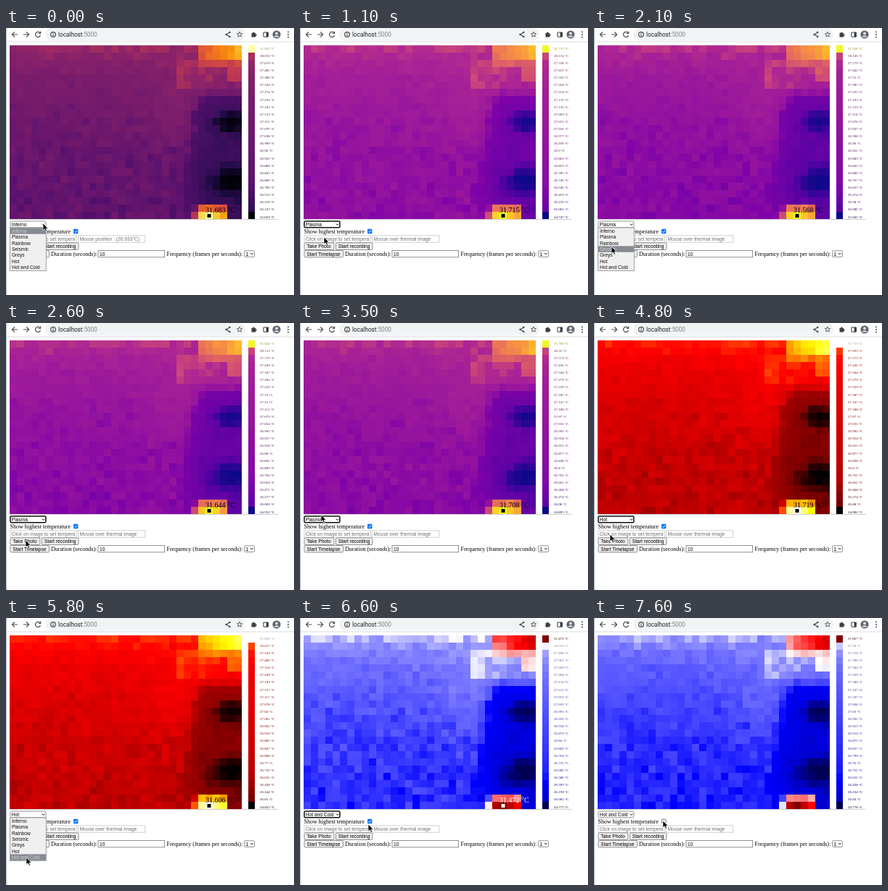
Write an HTML page with a canvas that moves like this. It is 397x369 px and loops after 8000 ms.

```html
<!DOCTYPE html>
<html lang="en">
<head>
<meta charset="utf-8">
<title>Thermal camera</title>
<style>
html, body { margin: 0; width: 100%; height: 100%; overflow: hidden; background: #fff; }
canvas, svg { position: absolute; left: 0; top: 0; }
text { font: 6.67px "Liberation Sans", Arial, sans-serif; white-space: pre; }
.serif { font: 8px "Liberation Serif", "Times New Roman", serif; }
.scale { font: 5px "Liberation Serif", "Times New Roman", serif; }
.peak { font: 10px "Liberation Serif", "Times New Roman", serif; }
.url { font: 8.2px Roboto, sans-serif; }
.hint { fill: #707070; }
.icon { fill: none; stroke: #4a4d51; stroke-width: 1.2; }
</style>
</head>
<body>
<canvas id="heat" width="397" height="369"></canvas>
<svg id="ui" width="397" height="369"></svg>
<script>
const LOOP = 8000, COLS = 32, ROWS = 24, CELL = 10, LEFT = 5, TOP = 24;
const OPTIONS = ['Inferno', 'Plasma', 'Rainbow', 'Seismic', 'Greys', 'Hot', 'Hot and Cold'];

// Palette from evenly spaced hex stops
function ramp(hex) {
  const stops = hex.split(' ').map(h => [0, 2, 4].map(i => parseInt(h.substr(i, 2), 16) / 255));
  const last = stops.length - 1;
  return v => {
    const i = Math.min(last - 1, Math.floor(v * last)), f = v * last - i;
    return stops[i].map((a, k) => a + (stops[i + 1][k] - a) * f);
  };
}

const PALETTES = {
  'Inferno': ramp('000004 210c4a 57106e 8a226a bc3754 e45a31 f98e09 f9cb35 fcffa4'),
  'Plasma': ramp('0d0887 4c02a1 7e03a8 aa2395 cc4778 e66c5c f89540 fdc527 f0f921'),
  'Hot': v => [v * 8 / 3, v * 8 / 3 - 1, v * 4 - 3],
  'Hot and Cold': v => [
    v > .75 ? 2.5 - 2 * v : 4 * v - 1,
    Math.min(4 * v - 1, 3 - 4 * v),
    v < .25 ? .3 + 2.8 * v : 3 - 4 * v
  ]
};

// time, palette, hottest, second, offset of the scale, coldest
const READINGS = [
  [0, 'Inferno', 31.683, 28.032, .045, 25.023],
  [600, 'Inferno', 31.702, 28.094, .02, 24.896],
  [1000, 'Plasma', 31.715, 28.154, -.015, 24.747],
  [1600, 'Plasma', 31.568, 28.146, .006, 25.045],
  [2500, 'Plasma', 31.644, 28.152, .003, 24.952],
  [3500, 'Plasma', 31.708, 28.16, 0, 24.895],
  [4800, 'Hot', 31.719, 27.993, 0, 24.902],
  [5800, 'Hot', 31.606, 28.021, -.03, 24.853],
  [6600, 'Hot and Cold', 31.472, 28.042, -.075, 24.775],
  [7600, 'Hot and Cold', 31.867, 27.94, -.04, 24.778]
];

// first step, last step, pointer x, pointer y
const MOVES = [
  [0, 0, 51, 270], [100, 200, 88, 299], [500, 700, 31, 290], [1100, 1100, 33, 289],
  [1200, 1500, 51, 271], [1600, 1800, 88, 299], [1900, 2100, 24, 302], [2300, 2600, 27, 300],
  [3500, 3500, 29, 265], [3600, 3700, 45, 270], [4100, 4100, 51, 271], [4200, 4300, 70, 300],
  [4400, 4500, 22, 320], [4800, 4800, 22, 292], [4900, 5300, 51, 271], [5700, 5800, 28, 331],
  [5900, 6000, 86, 276], [6200, 6200, 30, 331], [6600, 6600, 94, 285], [6700, 6800, 93, 293],
  [7000, 7000, 107, 280], [7400, 7400, 95, 280]
];

// time, highlighted option (-1: list closed)
const HOVERS = [
  [0, 0], [500, 2], [700, 1], [1000, -1], [1500, 1], [2000, 3], [2300, -1], [4100, 1],
  [4500, 5], [4800, -1], [5300, 5], [5700, 3], [5800, 6], [6600, -1]
];

const heat = document.getElementById('heat').getContext('2d');
const ui = document.getElementById('ui');

const latest = (list, t) => list.reduce((best, item) => item[0] <= t ? item : best);
const noise = (i, seed) => { const v = Math.sin(i * 12.9898 + seed * 78.233) * 43758.5453; return v - Math.floor(v) - .5; };
const bump = (c, r, x, y, w, h) => Math.exp(-(((c - x) / w) ** 2) - ((r - y) / h) ** 2);
const sigmoid = v => 1 / (1 + Math.exp(-v));
const clamp = v => Math.min(Math.max(v, 0), 1);
const color = (name, v, shade = 1) =>
  `rgb(${PALETTES[name](clamp(v)).map(a => Math.round(clamp(a) * shade * 255))})`;

// Temperature at a middle place of the scale: even steps, steeper at both ends
function scaleAt(i) {
  const d = 11 - i;
  return 27.031 + .0385 * d + (d > 0 ? .196 * (d / 9) ** 6 : -.155 * Math.max(0, -d - 7.6));
}

// Relative warmth of a cell; only its rank matters
function warmth(c, r, seed) {
  const i = r * COLS + c;
  let v = 1.1 * Math.exp(-r / 5) - .012 * r + .45 * bump(c, r, 23, 7, 4.5, 5)
    + .32 * noise(i, 1) + .28 * noise(i, seed + 2)
    - 1.6 * sigmoid((c - 25.3) * 1.7) * sigmoid((r - 6.8) * 1.6)
    - 2 * bump(c, r, 30.2, 10, 2.2, 1.4) - 2.2 * bump(c, r, 30.2, 18.3, 2.4, 1.6)
    - .5 * bump(c, r, 25, 18, 1.5, 4);
  if (c > 22 && r > 1 && r < 6) v += .45;
  if (c > 25 && r < 2) v += 2.6 + .35 * (c - 26);
  if (c > 25 && r === 2 || c > 29 && r > 2 && r < 5) v += 1.4;
  if (r > 21 && c > 25 && c < 30) v += r === 23 ? 9 - Math.abs(c - 27) : 6 - .5 * Math.abs(c - 27.5);
  if (c === 25 && r > 21) v += r === 23 ? 2.8 : .9;
  return v;
}

// Paints cells and colour bar, returns the bar's labels
function drawHeat([, name, max, second, offset, min], seed) {
  const scale = Array.from({ length: ROWS }, (_, i) =>
    i === 0 ? max : i === 1 ? second : i === ROWS - 1 ? min : scaleAt(i) + offset);
  const norm = v => (v - min) / (max - min);
  const cells = Array.from({ length: COLS * ROWS }, (_, i) => {
    const c = i % COLS, r = Math.floor(i / COLS);
    return { c, r, v: warmth(c, r, seed) };
  }).sort((a, b) => b.v - a.v);

  heat.clearRect(0, 0, 397, 369);
  cells.forEach(({ c, r }, rank) => {
    const p = rank / (cells.length - 1) * 23, i = Math.min(22, Math.floor(p));
    const f = i ? p - i : Math.sqrt(p);
    heat.fillStyle = color(name, norm(scale[i] + (scale[i + 1] - scale[i]) * f));
    heat.fillRect(LEFT + c * CELL, TOP + r * CELL, CELL, CELL);
  });
  scale.forEach((v, i) => {
    heat.fillStyle = color(name, norm(v));
    heat.fillRect(334, TOP + i * CELL, 9, CELL);
  });
  return scale.map((v, i) =>
    text(350, 29.6 + i * 10.13, +v.toFixed(3) + ' °C', 'scale', color(name, norm(v), .6))).join('');
}

const text = (x, y, s, cls = '', fill = '') =>
  `<text x="${x}" y="${y}" class="${cls}"${fill && ` fill="${fill}"`}>${s}</text>`;
const box = (x, y, w, h, fill, stroke = 'none', rx = 0, sw = .8) =>
  `<rect x="${x}" y="${y}" width="${w}" height="${h}" rx="${rx}" fill="${fill}" stroke="${stroke}" stroke-width="${sw}"/>`;
const dot = (x, y, r, fill = '#4a4d51') => `<circle cx="${x}" cy="${y}" r="${r}" fill="${fill}"/>`;
const path = (d, attrs = 'class="icon"') => `<path d="${d}" ${attrs}/>`;
const button = (x, y, w, s) => box(x, y, w, 9.6, '#efefef', '#767676', 1.5) + text(x + 3.4, y + 7.2, s);
const chevron = (x, y) => path(`M${x} ${y}l1.8 1.9 1.8-1.9`, 'fill="none" stroke="#111"');

const star = Array.from({ length: 10 }, (_, i) => {
  const a = i * Math.PI / 5, r = i % 2 ? 1.7 : 3.8;
  return `${322 + r * Math.sin(a)} ${9 - r * Math.cos(a)}`;
}).join('L');

const toolbar = box(54, 0, 276, 17.5, '#f1f3f4', 'none', 8.5) + box(0, 18.5, 397, 1, '#dadce0')
  + path('M16 9H8.6M12 5.3L8.4 9l3.6 3.7M24 9h7.4M28 5.3L31.6 9 28 12.7')
  + path('M47 6.8A3.6 3.6 0 1 0 47.5 10.2M47.6 4.8v2.7h-2.8')
  + '<circle cx="65" cy="9" r="3.4" class="icon"/>' + path('M65 8.5v2.6M65 6.7v1')
  + text(72, 12, 'localhost<tspan fill="#80868b">:5000</tspan>', 'url', '#202124')
  + path('M308 6.2l-4.4 2.8 4.4 2.8') + dot(308.2, 6, 1.3) + dot(303.6, 9, 1.3) + dot(308.2, 12, 1.3)
  + path(`M${star}Z`, 'fill="none" stroke="#4a4d51" stroke-width=".9"')
  + box(338.5, 7, 5.6, 5.6, '#3c4043') + dot(341.3, 6.7, 1.3) + dot(344.4, 9.8, 1.3)
  + box(355, 6, 6.4, 6.2, 'none', '#3c4043', .6, 1.1) + box(358.6, 6, 2.8, 6.2, '#3c4043')
  + dot(373, 9, 5.6, '#5f6771') + dot(373, 7.4, 1.9, '#dfe3e8')
  + path('M369.5 12.4a3.6 2.8 0 0 1 7 0z', 'fill="#dfe3e8"')
  + dot(389, 5.5, 1) + dot(389, 9, 1) + dot(389, 12.5, 1)
  + box(0, 0, 1, 369, '#b9c3d0') + box(5, 264, 370, .7, '#bbb');

function form(name, open, checked, mouse) {
  const ring = !open && checked;
  return box(5.9, 267, 49, 8.8, '#fff', ring ? '#101010' : '#767676', 1.5, ring ? 1.5 : .8)
    + text(7.7, 273.8, name) + chevron(49.7, 270.6)
    + text(5.5, 284, 'Show highest temperature', 'serif')
    + (checked
      ? box(93, 277.8, 6.4, 6.4, '#0075ff', 'none', 1) + path('M94.4 281.1l1.4 1.5 2.4-3', 'fill="none" stroke="#fff"')
      : box(93.4, 278.2, 5.7, 5.7, '#fff', '#555', 1))
    + box(5.9, 286.9, 91.4, 9.3, '#fff', '#c4c4c4') + text(7.5, 294, 'Click on image to set tempera', 'hint')
    + box(99.6, 286.9, 92.2, 9.3, '#fff', '#c4c4c4') + text(101.5, 294, mouse, 'hint')
    + button(5.9, 296.9, 41, 'Take Photo') + button(49.4, 296.9, 50.6, 'Start recording')
    + button(5.9, 307.3, 53.6, 'Start Timelapse')
    + text(62, 314.8, 'Duration (seconds):', 'serif') + box(127, 307.4, 91.6, 9.4, '#fff', '#767676') + text(129, 314.5, '10')
    + text(221.5, 314.8, 'Frequency (frames per seconds):', 'serif')
    + box(328.5, 307.8, 14, 8.6, '#fff', '#767676', 1.5) + text(330.5, 314.5, '1') + chevron(337, 311);
}

const menu = hover => box(5.5, 276, 49.8, 59.4, '#f0f0f0', '#8a8a8a')
  + OPTIONS.map((name, i) => (i === hover ? box(6, 276.3 + i * 8.35, 48.9, 8.4, '#868a92') : '')
    + text(7.9, 282.9 + i * 8.35, name, '', i === hover ? '#d2d4d8' : '#111')).join('');

// The pointer advances once every 100 ms during a move
function pointer(t) {
  const move = latest(MOVES, t), from = MOVES[Math.max(0, MOVES.indexOf(move) - 1)];
  const [start, end, x, y] = move;
  const f = Math.min(1, (Math.floor((t - start) / 100) + 1) / ((end - start) / 100 + 1));
  const at = `${from[2] + (x - from[2]) * f} ${from[3] + (y - from[3]) * f}`;
  return path('M0 0V9.8L2.3 7.8 3.8 11.2 5.5 10.5 4 7.2H7Z',
    `transform="translate(${at})" stroke="#fff" stroke-width=".7"`);
}

let shownReading, shownStep, legend;

function frame(now) {
  const t = now % LOOP, step = Math.floor(t / 100), reading = latest(READINGS, t);
  if (reading !== shownReading) legend = drawHeat(reading, READINGS.indexOf(reading));
  if (step !== shownStep) {
    const [, name, max] = reading, hover = latest(HOVERS, t)[1], open = hover >= 0;
    const ink = name === 'Hot and Cold' ? '#fff' : '#000';
    const peak = t < 7600 ? text(275, 254.6, max.toFixed(3) + ' °C', 'peak', ink) + box(277.5, 257, 5, 5, ink) : '';
    const mouse = t < 600 ? 'Mouse position : (26.933°C)' : 'Mouse over thermal image';
    ui.innerHTML = toolbar + legend + peak + form(name, open, t < 7400, mouse) + (open ? menu(hover) : '') + pointer(t);
  }
  shownReading = reading;
  shownStep = step;
  requestAnimationFrame(frame);
}
requestAnimationFrame(frame);
</script>
</body>
</html>
```
